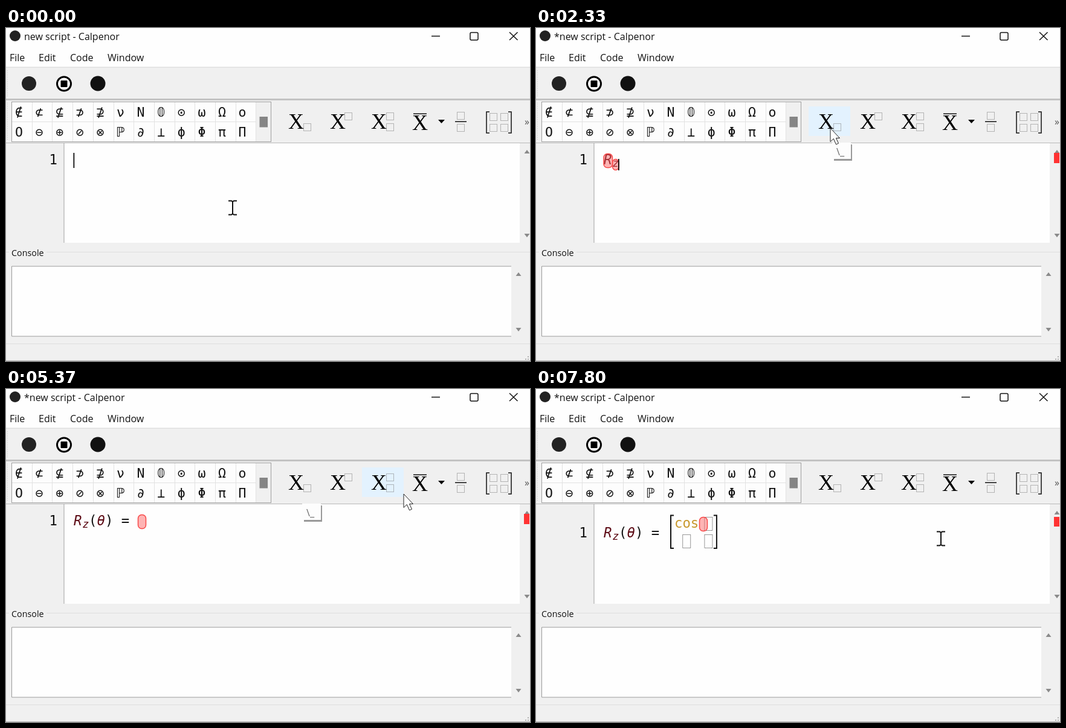
Write an HTML page that moves like this. It is 867x552 px and loops after 8 s.

```html
<!DOCTYPE html>
<html lang="en">
<head>
<meta charset="utf-8">
<title>Script editor</title>
<style>
  html, body { margin: 0; width: 100%; height: 100%; overflow: hidden; background: #f0f0f0; }
  svg { display: block; width: 100%; height: 100%; }
  text { font: 16px "Open Sans", sans-serif; fill: #111; white-space: pre; }
  .mono text { font: 22.3px "DejaVu Sans Mono", "DejaVu Sans", monospace; }
  .mono .id { font-style: italic; fill: #5c0a14; }
  #symbols text { text-anchor: middle; font-size: 21.5px; }
  .big { font: 36px "Liberation Serif", serif; fill: #000; }
  .slot { fill: none; stroke: #777; stroke-dasharray: 1 1; }
  #code .slot { stroke: #333; }
  .mark { fill: #ff5a5a; fill-opacity: .45; stroke: #f84848; stroke-width: 1.5; }
  .line { fill: none; stroke: #111; stroke-width: 1.5; }
</style>
</head>
<body>
<svg viewBox="0 0 867 552" preserveAspectRatio="none">
  <rect width="867" height="65" fill="#fefefe"/>
  <circle cx="15" cy="13" r="9" fill="#222"/>
  <text id="title" x="30" y="20"></text>
  <path class="line" d="M704 13.5h14M833 7l13.500 13m0-13l-13.500 13"/>
  <rect class="line" x="768" y="7.5" width="13" height="12.5" rx="2"/>
  <text x="6" y="55">File</text><text x="54" y="55">Edit</text>
  <text x="106" y="55">Code</text><text x="168" y="55">Window</text>

  <path d="M0 65H867" stroke="#d4d4d4"/>
  <path d="M0 118.500H867" stroke="#c3c3c3" stroke-width="3"/>
  <path d="M0 190.5H867" stroke="#b8b8b8"/>
  <path d="M2.5 70V114M2.5 124V186" stroke="#c4c4c4" stroke-dasharray="1 2"/>
  <circle cx="38" cy="92" r="12" fill="#222"/>
  <circle cx="96" cy="92.5" r="11.5" fill="#fff" stroke="#000" stroke-width="3"/>
  <rect x="90.5" y="87" width="11" height="11" rx="1"/>
  <circle cx="152" cy="92" r="12.5" fill="#111"/>

  <rect x="9.5" y="122.5" width="429" height="66" fill="#fdfdfd" stroke="#a0a0a0"/>
  <rect x="414" y="123" width="24" height="65" fill="#f0f0f0"/>
  <rect x="419.5" y="147" width="13.5" height="17.5" fill="#858585"/>
  <g id="symbols" class="mono"></g>

  <rect id="hover" y="130" height="49" fill="#e3f2fe"/>
  <g id="buttons"></g>
  <path d="M715 152h11l-5.5 6z"/>
  <path class="line" d="M674 142.3h22M743 155.2h19"/>
  <path class="line" d="M800 139h-5v35h5M831 139h5v35h-5"/>
  <text x="858" y="161" style="fill:#555">»</text>

  <rect x="96" y="191" width="754" height="165" fill="#fefefe"/>
  <path d="M96 191V356" stroke="#a0a0a0"/>
  <path d="M0 371.5H5M67 371.5H867M0 523.5H867" stroke="#dedede"/>
  <text x="9" y="378" style="font-size:14.3px">Console</text>
  <rect x="9" y="395" width="827" height="116" fill="#fefefe"/>
  <path d="M836 395H9.5V511H836" fill="none" stroke="#9a9a9a"/>
  <path d="M857.500 208h9l-4.500-6zM857.500 341h9l-4.500 6zM843.500 411h9l-4.500-6zM843.500 497h9l-4.500 6z" fill="#8a8a8a"/>
  <path d="M864 544v8M860 548v4" stroke="#b0b0b0" stroke-width="2" stroke-dasharray="2 2"/>
  <path d="M0 551.5H867" stroke="#b4b4b4"/>

  <g id="code" class="mono"></g>
  <g id="tip">
    <rect x="493" y="193" width="30" height="27" fill="#999"/>
    <rect x="490" y="190" width="31" height="27" fill="#fdfdfd"/>
    <text x="497" y="211" style="fill:#666">\_</text>
  </g>
  <path id="arrow" d="M0 0V22.500L5.300 17.500L9.500 27L13.500 25.200L9.500 16.500H15.500Z" fill="#fff" stroke="#222"/>
  <g id="beam" fill="none">
    <path d="M-7-11.500H-2L0-10L2-11.500H7M0-10V10M-7 11.500H-2L0 10L2 11.500H7" stroke="#111" stroke-width="2"/>
  </g>
</svg>
<script>
const $ = id => document.getElementById(id);
const LOOP = 8000;

const box = (cls, x, y, w, h, rx = 0) =>
  `<rect class="${cls}" x="${x}" y="${y}" width="${w}" height="${h}" rx="${rx}"/>`;
const text = (x, y, str, cls = '', style = '') =>
  `<text x="${x}" y="${y}" class="${cls}" style="${style}">${str}</text>`;
const mark = (x, y, w, h = 23) => box('mark', x, y, w, h, 6);
const slot = (x, y, w = 12, h = 12) => box('slot', x + .5, y + .5, w, h);

// Symbol palette
const rows = ['∉⊄⊈⊅⊉νN𝟘⊙ωΩο', 'Ο⊖⊕⊘⊗ℙ∂⊥ϕΦπΠ'];
let grid = '<path d="M10 155.500H414';
for (let i = 1; i <= 12; i++) grid += `M${Math.round(9 + 33.7 * i) + .5} 123V188`;
grid += '" stroke="#e2e2e2"/>';
rows.forEach((row, r) => [...row].forEach((c, i) => grid += text(21.5 + 33.6 * i, 146.5 + 33 * r, c)));
$('symbols').innerHTML = grid;

// Toolbar templates
$('buttons').innerHTML =
  [[467, 167], [536, 167], [604, 167], [672, 169]].map(([x, y]) => text(x, y, 'X', 'big')).join('') +
  [[492, 158], [560, 140], [629, 140], [629, 158], [746, 139], [746, 159],
   [800, 141], [818, 141], [800, 159], [818, 159]].map(p => slot(...p)).join('');
const edges = [451, 520, 589, 658, 736, 776, 854];

// Editing steps: each entry changes part of the state
const R = [112, 208.5, 14.5], Z = [126.5, 217.5, 10.5, 18], SUB = [126.5, 217.5, 11, 18];
const gap = (x, w = 13) => [x, 208.5, w];
const steps = [
  [0, { rest: '', marks: [], caret: 112.5, on: 1 }],
  [200, { on: 0 }],
  [500, { on: 1 }],
  [800, { named: 1, marks: [R], caret: 126.5, bar: [207, 17] }],
  [1110], [1210], [1310], [1420],
  [1520, { marks: [R, SUB], caret: 136.5 }],
  [1720, { caret: 127.5, small: 1 }],
  [2020, { sub: 1, marks: [R], caret: 137 }],
  [2120, { tip: 1 }],
  [2330, { marks: [R, Z] }],
  [2530, { small: 0, caret: 136.5 }],
  [2830, { rest: '(', marks: [R, Z, gap(149)], caret: 149.5 }],
  [2930, { bar: [208, 26] }],
  [3240, { rest: '(\\', marks: [R, Z, gap(149, 15)], caret: 164.5 }],
  [3440, { rest: '(\\t', marks: [R, Z, gap(149, 28)], caret: 177.5 }],
  [3540, { rest: '(\\th', marks: [R, Z, gap(149, 42)], caret: 191 }],
  [3640, { rest: '(\\thet', marks: [R, Z, gap(149, 69)], caret: 218 }],
  [3940, { rest: '(\\theta', marks: [R, Z, gap(149, 82)], caret: 231 }],
  [4040, { rest: '(θ', marks: [R, Z, gap(163)], caret: 164.5 }],
  [4250, { rest: '(θ)', marks: [R, Z], caret: 177.5, bar: [207, 17] }],
  [4560, { caret: 191 }],
  [4770, { rest: '(θ) =', marks: [gap(204)], caret: 204.5 }],
  [4970, { marks: [gap(218.5)], caret: 218.5 }],
  [5270, { on: 0 }],
  [5370],
  [5470, { tip: 0 }],
  [5570], [5670],
  [5770, { cell: '', drop: 20, marks: [[228, 212.5, 13]], caret: 275, on: 1 }],
  [5870], [5970],
  [6170, { on: 0 }],
  [6480, { on: 1, caret: 250.5, lift: 13, bar: [212, 16] }],
  [6680, { caret: 229 }],
  [6780, { lift: -16 }],
  [7080, { on: 0 }],
  [7380, { on: 1, cell: 'co', marks: [[229, 212.5, 27]], caret: 257 }],
  [7490, { cell: 'cos', marks: [[270.5, 212.5, 13]], caret: 272 }],
  [7800, { on: 0 }],
];

// Pointer path: time, x, y
const path = [[1010, 375, 298], [1420, 487, 166], [5170, 487, 166], [5370, 658, 174],
              [5670, 810, 154], [5770, 810, 154], [5970, 670, 248]];
function pointer(t) {
  if (t <= path[0][0]) return path[0].slice(1);
  const i = path.findIndex(p => p[0] >= t);
  if (i < 0) return path.at(-1).slice(1);
  const [a, b] = [path[i - 1], path[i]], k = (t - a[0]) / (b[0] - a[0]);
  return [a[1] + (b[1] - a[1]) * k, a[2] + (b[2] - a[2]) * k];
}

function matrix(cell) {
  // the first column is one character wide even when empty
  const grow = Math.max(0, cell.length - 1) * 14.2, end = 270.5 + grow;
  const ink = cell === 'cos' ? 'fill:#c8982c' : 'fill:#5c0a14';
  return `<path class="line" style="stroke-width:2" d="M228 209.500h-5v54.500h5M${end - 5} 209.500h5v54.500h-5"/>` +
    (cell ? text(229, 230, cell, '', ink) : slot(228, 212, 13, 22)) +
    slot(250 + grow, 212, 13, 22) + slot(228 + grow / 2, 241, 13, 22) + slot(250 + grow, 241, 13, 22);
}

function codeView(s) {
  const drop = s.drop || 0, base = 226 + drop;
  let out = text(71.5, base, '1');
  if (s.named) out += text(112, base, 'R', 'id');
  if (s.sub) out += text(126.5, base + 4, 'z', 'id', 'font-size:18px');
  out += text(137, base, s.rest.replace('θ', '<tspan class="id">θ</tspan>'));
  if (s.cell !== undefined) out += matrix(s.cell);
  out += s.marks.map(m => mark(...m)).join('');
  if (s.on) {
    const top = (s.small ? 217 : 207) + drop + (s.lift || 0);
    out += `<rect x="${s.caret - 1}" y="${top}" width="1.7" height="${s.small ? 19 : 25}"/>`;
  }
  if (s.bar) out += `<rect x="857" y="${s.bar[0]}" width="9" height="${s.bar[1]}" fill="#ff3232"/>`;
  return out;
}

function draw(count) {
  const shown = steps.slice(0, count);
  const s = Object.assign({}, ...shown.map(e => e[1]));
  const [x, y] = pointer(shown.at(-1)[0]);
  const hot = edges.findIndex(e => e >= x) - 1;
  const over = hot >= 0 && y > 130 && y < 179;
  $('hover').setAttribute('x', over ? edges[hot] : 0);
  $('hover').setAttribute('width', over ? edges[hot + 1] - edges[hot] : 0);
  $('title').textContent = (s.named ? '*' : '') + 'new script - Calpenor';
  $('code').innerHTML = codeView(s);
  $('tip').style.display = s.tip ? '' : 'none';
  const inEditor = y > 191;
  for (const [id, on] of [['arrow', !inEditor], ['beam', inEditor]]) {
    $(id).style.display = on ? '' : 'none';
    $(id).setAttribute('transform', `translate(${x} ${y})`);
  }
}

let last = 0;
const start = performance.now();
function tick() {
  const t = (performance.now() - start) % LOOP;
  const count = steps.filter(e => e[0] <= t).length;
  if (count !== last) draw(last = count);
  requestAnimationFrame(tick);
}
tick();
</script>
</body>
</html>
```
